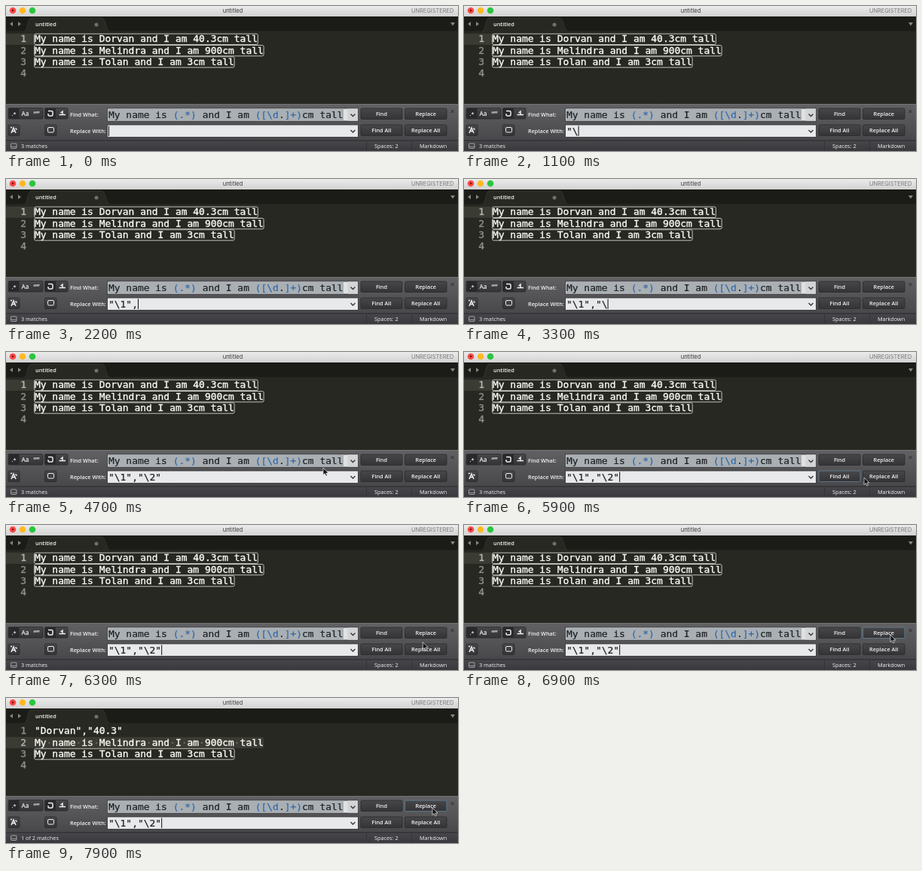
An HTML page for the animation above (8000 ms loop, 600 px wide and 194 px high).

```html
<!DOCTYPE html>
<html lang="en">
<head>
<meta charset="utf-8">
<title>Regex replace</title>
<style>
  html, body { margin: 0; width: 100%; height: 100%; overflow: hidden; background: #272822; }
  svg { display: block; width: 600px; height: 194px; }
  text { white-space: pre; }
  .code, .field { font: 12.95px "DejaVu Sans Mono", monospace; stroke-width: .35; }
  .code { fill: #fbfbf6; stroke: #fbfbf6; }
  .field { fill: #1d2023; stroke: #1d2023; stroke-width: .2; }
  .re { fill: #2f69ad; stroke: #2f69ad; }
  .num { fill: #8f908a; stroke: #8f908a; text-anchor: end; }
  .num.active { fill: #b5b6ae; stroke: #b5b6ae; }
  .space { fill: #77776b; stroke: none; }
  .ui { font: 7.3px "Open Sans", sans-serif; fill: #f2f2f2; }
  .bold { font-weight: 600; }
  .mid { text-anchor: middle; }
  .title { font: 7.6px Inter, sans-serif; fill: #3c3c3c; }
  .box { fill: none; stroke: #d2d2cb; stroke-width: .9; }
  .btn { fill: url(#btn); stroke: #2a2a2c; stroke-width: .8; }
  .btn.hover { stroke: #648497; }
  .icon { fill: none; stroke: #f0f0f0; stroke-width: 1.5; }
</style>
</head>
<body>
<svg viewBox="0 0 600 194" xmlns="http://www.w3.org/2000/svg">
  <defs>
    <linearGradient id="bar" x2="0" y2="1"><stop stop-color="#ebebeb"/><stop offset="1" stop-color="#d2d2d2"/></linearGradient>
    <linearGradient id="panel" x2="0" y2="1"><stop stop-color="#616163"/><stop offset="1" stop-color="#48484a"/></linearGradient>
    <linearGradient id="btn" x2="0" y2="1"><stop stop-color="#47474a"/><stop offset="1" stop-color="#343437"/></linearGradient>
    <linearGradient id="status" x2="0" y2="1"><stop stop-color="#47474b"/><stop offset="1" stop-color="#39393d"/></linearGradient>
  </defs>

  <!-- title bar -->
  <rect width="600" height="14" fill="url(#bar)"/>
  <circle cx="9" cy="6" r="4.300" fill="#fc4b48"/>
  <circle cx="9" cy="6" r="1.400" fill="#7d1512"/>
  <circle cx="22" cy="6" r="4.300" fill="#fdb924"/>
  <circle cx="35" cy="6" r="4.300" fill="#2bc63f"/>
  <text class="title mid" x="301" y="9.3">untitled</text>
  <text class="title" x="538" y="9.3" style="font-size:7.4px;fill:#777">UNREGISTERED</text>

  <!-- tabs -->
  <rect y="14" width="600" height="20" fill="#1b1c18"/>
  <path d="M24 34C29 33 28 16 34 16H127C133 16 132 33 138 34Z" fill="#272822" stroke="#3b3c36" stroke-width=".7"/>
  <rect y="33.5" width="600" height="98" fill="#272822"/>
  <path d="M9 21v6l-4-3zM16 21v6l4-3z" fill="#85867f"/>
  <path d="M590 22h6l-3 4.5z" fill="#85867f"/>
  <text class="ui bold" x="39" y="27.3">untitled</text>
  <circle cx="120" cy="25" r="2.5" fill="#70716b"/>

  <g id="editor"></g>

  <!-- find panel -->
  <rect y="131" width="600" height="49" fill="url(#panel)"/>
  <path d="M0 131.5H600" stroke="#747476"/>
  <g id="buttons"></g>
  <g class="ui bold mid">
    <text x="10.5" y="147">.*</text>
    <text x="25.5" y="146.6" style="font-size:8px">Aa</text>
    <text x="40.5" y="149" style="font-size:10px">“”</text>
  </g>
  <g class="icon">
    <path d="M56 144v1.500q0 1.500 1.500 1.500h3q1.500 0 1.500-1.500v-3.500q0-1.500-1.500-1.500h-4.500"/>
    <path d="M70.500 145.500h8.500M75 145v-4l-2.500 2"/>
    <path d="M7 170l3-7 3 7M8.500 167.500h3M6 162.500h2M12.500 163.500l2 2"/>
    <rect x="55.500" y="162.500" width="8" height="6.500" rx="1.500" stroke-width="1"/>
    <path d="M590.500 139l4 4m0-4l-4 4" style="stroke:#2a2a2c;stroke-width:1"/>
  </g>
  <text class="ui bold" x="85" y="148.3">Find What:</text>
  <text class="ui bold" x="85" y="170">Replace With:</text>

  <rect x="134.5" y="137" width="333" height="17" fill="#dfe0e2" stroke="#303033" stroke-width=".8"/>
  <rect x="135.500" y="137.500" width="312.500" height="16" fill="#a9afb3"/>
  <rect x="453.5" y="137.4" width="13.6" height="16.2" fill="#d3d4d5"/>
  <rect x="134.5" y="159" width="333" height="16.5" fill="#e8e9ea" stroke="#303033" stroke-width=".8"/>
  <path d="M457.500 144.500l3 3 3-3M457.500 166l3 3 3-3" fill="none" stroke="#333" stroke-width="1.300"/>
  <text class="field" x="136" y="150">My name is <tspan class="re">(.*)</tspan> and I am <tspan class="re">([\d</tspan>.<tspan class="re">]+)</tspan>cm tall</text>
  <text class="field" id="typed" x="136" y="172"></text>
  <rect id="caret" y="160.5" width="1" height="13.5" fill="#111"/>

  <!-- status bar -->
  <rect y="180" width="600" height="14" fill="url(#status)"/>
  <path d="M0 180H600" stroke="#29292c"/>
  <path d="M478.500 181V194M538.500 181V194" stroke="#343438"/>
  <rect x="6.5" y="184" width="7.5" height="6.5" rx="1" fill="none" stroke="#bbb" stroke-width=".8"/>
  <path d="M7 188.3h7" stroke="#bbb" stroke-width=".8"/>
  <text class="ui" id="count" x="20" y="190"></text>
  <text class="ui" x="489" y="190">Spaces: 2</text>
  <text class="ui" x="549" y="190">Markdown</text>

  <path id="mouse" d="M0 0V9.5L2.2 7.5 3.8 11 5.4 10.3 3.9 7H7Z" fill="#111" stroke="#eee" stroke-width=".7"/>
</svg>
<script>
const LOOP = 8000, STEP = 100, REPLACED = 7500;
const FINAL = '"\\1","\\2"';
const KEY_TIMES = [600, 1000, 1600, 1900, 2200, 2700, 3100, 3600, 4000];
const PATH = [ // time, x, y
  [4600, 417, 157], [4700, 421, 155], [5000, 452, 160], [5400, 503, 166],
  [5900, 531, 168], [6200, 549, 160], [6600, 566, 147], [LOOP, 566, 147]
];
const LINES = [
  'My name is Dorvan and I am 40.3cm tall',
  'My name is Melindra and I am 900cm tall',
  'My name is Tolan and I am 3cm tall'
];
const CHAR = 7.796, PITCH = 15.3;
const $ = id => document.getElementById(id);

function add(parent, tag, attrs, text = '') {
  const el = document.createElementNS('http://www.w3.org/2000/svg', tag);
  for (const key in attrs) el.setAttribute(key, attrs[key]);
  el.textContent = text;
  parent.append(el);
  return el;
}

const button = (x, y, width, label = '') => {
  const el = add($('buttons'), 'rect', { class: 'btn', x, y, width, height: 14.5, rx: 1.5 });
  if (label) add($('buttons'), 'text', { class: 'ui bold mid', x: x + width / 2, y: y + 9.8 }, label);
  return el;
};
const pressed = x => add($('buttons'), 'rect', { x, y: 137, width: 14, height: 13.5, fill: '#29292b' });
button(3, 136.5, 46);
pressed(3.5);
button(51.5, 136.5, 30.5);
pressed(52);
button(3, 159, 15);
button(51.5, 159, 15.5);
button(471, 137, 55, 'Find');
const replaceBtn = button(529.5, 137, 55.5, 'Replace');
const findAllBtn = button(471, 159, 55, 'Find All');
button(529.5, 159, 55.5, 'Replace All');

// Editor contents before and after the replacement
function drawEditor(done) {
  const g = add($('editor'), 'g', {});
  const row = done ? 1 : 0, top = i => 36.9 + i * PITCH;
  add(g, 'rect', { y: top(row), width: 37, height: 15, fill: '#3a3b33' });
  if (done) add(g, 'rect', { x: 37, y: top(1), width: 39 * CHAR + 1, height: 15, fill: '#3b3b33', rx: 2 });
  for (let i = 0; i < 4; i++) {
    const y = 48.2 + i * PITCH;
    add(g, 'text', { class: 'code num' + (i === row ? ' active' : ''), x: 27, y }, i + 1);
    if (i === 3) break;
    const line = done && i === 0 ? '"Dorvan","40.3"' : LINES[i];
    if (!done || i === 2)
      add(g, 'rect', { class: 'box', x: 37.5, y: top(i) + .3, width: line.length * CHAR + .6, height: 14.4, rx: 2 });
    if (done && i === 1)
      add(g, 'text', { class: 'code space', x: 38, y }, line.replace(/\S/g, '\u00a0').replace(/ /g, '·'));
    add(g, 'text', { class: 'code', x: 38, y }, line);
  }
  return g;
}
const before = drawEditor(false), after = drawEditor(true);

function mouseAt(t) {
  const i = PATH.findIndex(p => p[0] > t);
  if (i < 1) return null;
  const [t0, x0, y0] = PATH[i - 1], [t1, x1, y1] = PATH[i];
  const k = (t - t0) / (t1 - t0);
  return [x0 + (x1 - x0) * k, y0 + (y1 - y0) * k];
}

const show = (el, on) => el.setAttribute('visibility', on ? 'visible' : 'hidden');

function render(t) {
  const done = t >= REPLACED;
  show(before, !done);
  show(after, done);
  $('count').textContent = done ? '1 of 2 matches' : '3 matches';

  const typed = KEY_TIMES.filter(k => k <= t);
  $('typed').textContent = FINAL.slice(0, typed.length);
  $('caret').setAttribute('x', 136 + typed.length * CHAR);
  const phase = t % 1000, fresh = typed.length && t - typed[typed.length - 1] < 400;
  show($('caret'), fresh || phase <= 300 || phase >= 800);

  const pos = mouseAt(t);
  show($('mouse'), pos);
  if (pos) $('mouse').setAttribute('transform', `translate(${pos})`);
  const [x, y] = pos || [0, 0];
  findAllBtn.classList.toggle('hover', x >= 471 && x <= 531 && y >= 159);
  replaceBtn.classList.toggle('hover', x > 531 && y < 152);
}

const start = performance.now();
function frame() {
  const t = (performance.now() - start) % LOOP;
  render(Math.floor(t / STEP) * STEP);
  requestAnimationFrame(frame);
}
frame();
</script>
</body>
</html>
```
